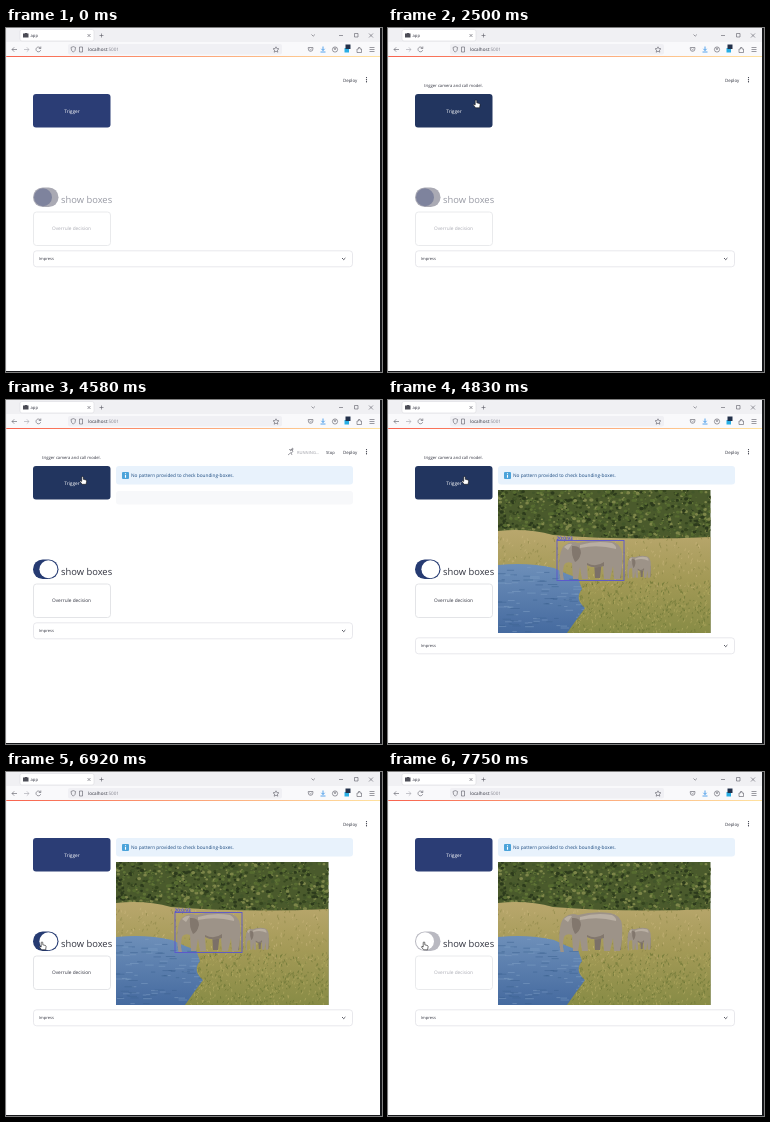
Write an HTML page that moves like this. It is 376x344 px and loops after 8000 ms.

```html
<!DOCTYPE html>
<html lang="en">
<head>
<meta charset="utf-8">
<title>app</title>
<style>
  html, body { margin: 0; width: 100%; height: 100%; overflow: hidden; background: #fff; }
  svg { display: block; width: 376px; height: 344px; }
  text { font: 4.75px "Open Sans", "Noto Sans", sans-serif; fill: #31333f; text-rendering: geometricPrecision; }
  .mid { text-anchor: middle; }
  .line { fill: none; stroke: #5c5c66; stroke-width: .6; }
</style>
</head>
<body>
<svg viewBox="0 0 376 344">
  <defs>
    <linearGradient id="stripe">
      <stop offset="0" stop-color="#f8634f"/><stop offset="1" stop-color="#ffe2a0"/>
    </linearGradient>
    <linearGradient id="lake" x2="0" y2="1">
      <stop offset="0" stop-color="#6d8fb9"/><stop offset="1" stop-color="#456a9f"/>
    </linearGradient>
    <linearGradient id="ground" x2="0" y2="1">
      <stop offset="0" stop-color="#b9a76d"/><stop offset=".45" stop-color="#a49a57"/>
      <stop offset="1" stop-color="#878b45"/>
    </linearGradient>
    <clipPath id="crop"><path d="M110 90H322.500V233H110Z"/></clipPath>
    <clipPath id="shore"><path id="shoreShape" d="M110 165Q140 162 166 168Q178 174 190 178L194 189Q186 199 197 208Q188 220 179 233H110Z"/></clipPath>
    <g id="elephant">
      <path fill="#7b7068" d="M206 160H214L212 178H207ZM229 158H234L233 178H229Z"/>
      <path fill="#9d9388" d="M177 145Q183 140 190 143Q205 139 222 141Q233 143 234 153Q235 166 232 179H226L225 166L222 179H216L215 166Q205 169 199 165L200 179H194L192 167L190 179H185L184 163Q178 161 176 165Q174 173 176 180H172.500Q170 168 172 156Q173 148 177 145Z"/>
      <path fill="#82776d" d="M184 146Q193 145 193 153Q191 161 187 162Q183 155 184 146ZM199 163Q208 168 216 162V166Q206 169 199 165Z"/>
      <path fill="#b9afa3" d="M192 145Q208 140 224 143Q229 146 228 149Q210 144 192 148ZM176 147Q180 143 184 144L180 150Z"/>
    </g>
  </defs>

  <!-- browser window -->
  <rect width="376" height="344" fill="#fff"/>
  <path d="M0 0H374V14H0Z" fill="#f0f0f3"/>
  <path d="M0 14H374V28H0Z" fill="#f9f9fb"/>
  <rect x="14" y="1.500" width="74" height="11.500" rx="2" fill="#fff" stroke="#dcdce1" stroke-width=".6"/>
  <path d="M17 5.500h1.500l.7-.6h1.600l.7.6h1v4h-5.500z" fill="#4b4c55"/>
  <text x="24.500" y="9" style="font-size:4.200px">app</text>
  <rect x="62" y="16" width="214" height="10.500" rx="2" fill="#f0f0f4"/>
  <text x="82" y="23" style="font-size:4.600px">localhost<tspan fill="#85858f">:5001</tspan></text>
  <g class="line">
    <path d="M81.500 6l3 3m0-3l-3 3M93.500 7.500h4m-2-2v4M305.500 6.500l1.700 1.700 1.700-1.700M333 7.500h4M348.500 5.500h3.500v3.500h-3.500zM363 5.500l4 4m0-4l-4 4"/>
    <path d="M11 21.500H6m2.200-2.200L6 21.500l2.200 2.200M34.500 20.200a2.400 2.400 0 1 0 .2 2M34.800 18.500v2h-2"/>
    <path d="M18 21.500h5m-2.200-2.200l2.200 2.200-2.200 2.200" stroke="#a5a5ad"/>
    <path d="M65 19.500l2.300-.9 2.300.9q0 3.500-2.300 4.700-2.300-1.200-2.300-4.700zM73.500 19h3v5h-3zM270 18.800l.9 1.800 2 .2-1.500 1.400.4 2-1.800-1-1.800 1 .4-2-1.500-1.400 2-.2z"/>
    <path d="M302.300 19.500h4.600v1.500a2.300 2.300 0 0 1-4.600 0zM303.500 20.800l1.100 1 1.100-1M351 21h1.500v-1.500h1.500V21h1.500v3.500H351zM363.500 19.500h5m-5 2h5m-5 2h5"/>
    <circle cx="329" cy="21.500" r="2.600"/><circle cx="329" cy="20.800" r=".8"/>
  </g>
  <path d="M317 18.500v4m-1.700-1.700l1.700 1.700 1.700-1.700M314.500 24h5" fill="none" stroke="#2f8fe8" stroke-width=".8"/>
  <path d="M338.500 20h4.500v4.500h-4.500z" fill="#28aee4"/>
  <path d="M339.500 16.500h5V21h-5z" fill="#22304a"/>
  <rect y="28" width="374" height="1" fill="url(#stripe)"/>

  <!-- page -->
  <text x="337" y="53.500" style="font-size:4.400px">Deploy</text>
  <path d="M360.500 49.500v.1m0 2v.1m0 2v.1" stroke="#31333f" stroke-width="1.200" stroke-linecap="round"/>
  <g id="running">
    <g id="runner" class="line"></g>
    <text x="291" y="53.500" style="font-size:4.100px;fill:#9a9ba3">RUNNING...</text>
    <text x="320" y="53.500" style="font-size:4.200px">Stop</text>
  </g>
  <rect id="trigger" x="27" y="66" width="77.500" height="33.500" rx="3"/>
  <text class="mid" x="66" y="84.600" style="fill:#fff">Trigger</text>
  <text id="tip" x="36" y="58.600" style="font-size:4.170px">trigger camera and call model.</text>
  <g id="info">
    <rect x="110" y="66" width="237" height="18.500" rx="3" fill="#e8f2fc"/>
    <rect x="116" y="72" width="7" height="7" rx="1" fill="#4ba3da"/>
    <path d="M119.500 73.200v1m0 .8v2.800" stroke="#fff" stroke-width="1.100"/>
    <text x="125" y="77" style="fill:#1c4b80">No pattern provided to check bounding-boxes.</text>
  </g>
  <rect id="skeleton" x="110" y="91" width="237" height="13.500" rx="3" fill="#f7f8fa"/>
  <rect id="track" x="27" y="159.500" width="25.500" height="19.500" rx="9.750"/>
  <circle id="knob" cy="169.250" r="9"/>
  <text id="label" x="55" y="174.800" style="font-size:9.400px">show boxes</text>
  <rect id="overrule" x="27.500" y="184" width="77" height="33.500" rx="3" fill="#fff" stroke-width=".8"/>
  <text id="overruleText" class="mid" x="65.500" y="202.300">Overrule decision</text>
  <g id="expander">
    <rect x="27.500" y="222.800" width="319" height="16" rx="3" fill="#fff" stroke="#e2e3e7" stroke-width=".8"/>
    <text x="33" y="232.300" style="font-size:4px">Impress</text>
    <path class="line" d="M336 230l1.700 1.700 1.700-1.700" style="stroke:#31333f;stroke-width:.8"/>
  </g>

  <g id="photo" clip-path="url(#crop)">
    <path d="M110 90H323V234H110Z" fill="#4a5a2c"/>
    <g id="bushes"></g>
    <path d="M110 131Q140 128 165 135Q240 141 323 137V234H110Z" fill="url(#ground)"/>
    <g id="grass"></g>
    <use href="#shoreShape" fill="url(#lake)"/>
    <g id="ripples" clip-path="url(#shore)"></g>
    <use href="#elephant"/>
    <use href="#elephant" transform="translate(175.500 76.500) scale(.373 .565)"/>
    <g id="boxes">
      <rect x="169" y="140.500" width="67" height="40" fill="none" stroke="#5a55cf" stroke-width=".9"/>
      <text x="168.500" y="140" style="fill:#3d40f0;font-weight:600">20:0.93</text>
    </g>
  </g>

  <path id="arrow" d="M0 0V8.500L2 6.700L3.400 9.600L4.700 9L3.400 6.200H6Z" fill="#fff" stroke="#111" stroke-width=".6"/>
  <path id="hand" d="M-.8 4V.4Q0-.6.8.4V2.800L3.500 3.500Q4.200 3.800 4.100 4.800L3.600 7.800H-.4L-2.600 4.900Q-2.400 3.700-.8 4.900Z" fill="#fff" stroke="#111" stroke-width=".6"/>

  <path d="M374 0h2v344H0v-1h374z" fill="#17181b"/>
  <path d="M0 0V343" stroke="#dcdce0" stroke-width=".6"/>
</svg>

<script>
const $ = id => document.getElementById(id);
const show = (id, on) => $(id).style.display = on ? "" : "none";
const set = (id, attrs) => {
  for (const key in attrs) $(id).setAttribute(key, attrs[key]);
};

let seed = 11;
const rand = (a, b) => {
  seed = (seed * 16807) % 2147483647;
  return a + (b - a) * seed / 2147483647;
};

// Scatter many copies of a small shape as one path.
function scatter(id, n, [x0, x1, y0, y1], shape, style) {
  let d = "";
  for (let i = 0; i < n; i++)
    d += `M${rand(x0, x1).toFixed(1)} ${rand(y0, y1).toFixed(1)}` + shape();
  $(id).innerHTML += `<path d="${d}" style="${style}"/>`;
}
const leaf = () => {
  const r = rand(.5, 2.2), h = r * .8;
  return `a${r} ${h} 0 1 0 ${2 * r} 0a${r} ${h} 0 1 0 ${-2 * r} 0`;
};
const blade = () => `l${rand(-1, 1.5)} ${-rand(1, 3)}`;
const wave = () => `h${rand(3, 10)}`;
const stroke = (color, width) => `fill:none;stroke:${color};stroke-width:${width}`;

for (const color of ["#35451f", "#5f7336", "#43562a", "#7d8649", "#2c3a1c", "#566b30"])
  scatter("bushes", 200, [106, 322, 90, 140], leaf, "fill:" + color);
scatter("grass", 220, [110, 322, 136, 190], blade, stroke("#8f8849", .7));
scatter("grass", 160, [110, 322, 138, 190], blade, stroke("#c9b67c", .6));
scatter("grass", 330, [172, 322, 183, 235], blade, stroke("#6c7636", .7));
scatter("grass", 330, [172, 322, 183, 235], blade, stroke("#b3aa62", .6));
scatter("ripples", 60, [108, 204, 166, 232], wave, stroke("#7f9fc5", .5));
scatter("ripples", 60, [108, 204, 170, 232], wave, stroke("#3b608f", .5));

const LOOP = 8000, FPS = 12;
// time, x, y of the pointer tip
const pointer = [
  [80, 378, 100], [830, 94, 68], [1420, 94, 68], [1670, 88, 72],
  [2500, 88, 72], [3000, 76.5, 76.5], [6333, 76.5, 76.5], [6920, 36, 170]
];
const ease = p => p * p * (3 - 2 * p);

function pointerAt(t) {
  const i = pointer.findIndex(k => k[0] > t);
  if (i < 0) return pointer.at(-1).slice(1);
  if (i === 0) return pointer[0].slice(1);
  const [a, b] = [pointer[i - 1], pointer[i]];
  const p = ease((t - a[0]) / (b[0] - a[0]));
  return [a[1] + (b[1] - a[1]) * p, a[2] + (b[2] - a[2]) * p];
}

const within = (t, a, b) => t >= a && t < b;
const poses = [
  "M284 51l2-1.500 1 2-2 1.500 1 2M285 52.500l-3 2.500M286 50l-3-.5",
  "M284 51l2-1.500 0 2.500-2 3M286 52l2 2.500M286 50l2 1"
];

function draw(ms) {
  const t = Math.floor((ms % LOOP + 5) * FPS / 1000) * 1000 / FPS;

  const [x, y] = pointerAt(t);
  const hover = x > 27 && x < 104 && y > 66 && y < 99;
  const hand = hover || y > 159;
  const at = { transform: `translate(${x} ${y})` };
  set("arrow", at);
  set("hand", at);
  show("arrow", !hand);
  show("hand", hand);

  set("trigger", { fill: hover ? "#22355f" : "#2b3d75" });
  show("tip", hover && t > 1150);

  const running = within(t, 3660, 4830);
  show("running", running);
  if (running) $("runner").innerHTML =
    `<circle cx="286.500" cy="49" r=".7"/><path d="${poses[Math.floor(t / 160) % 2]}"/>`;

  const ready = t > 4400;
  const photo = within(t, 4660, 7240) || t > 7490;
  show("info", ready);
  show("skeleton", within(t, 4490, 4660));
  show("photo", photo);
  show("boxes", t < 7240);
  set("expander", { transform: `translate(0 ${photo ? 15 : 0})` });

  const on = within(t, 4400, 7160);
  const slide = t < 4400 ? 0 : on ? 1 : Math.max(0, 1 - (t - 7160) / 160);
  set("track", { fill: !ready ? "#aaaab4" : on ? "#263b72" : "#b9b9c1" });
  set("knob", { cx: 37 + 5.4 * slide, fill: ready ? "#fff" : "#7e839d" });
  $("label").style.fill = ready ? "#31333f" : "#989aa4";

  const enabled = within(t, 4400, 7240);
  set("overrule", { stroke: enabled ? "#dcdde1" : "#e4e5e8" });
  $("overruleText").style.fill = enabled ? "#31333f" : "#abacb4";
}

const start = performance.now();
function tick() {
  draw(performance.now() - start);
  requestAnimationFrame(tick);
}
tick();
</script>
</body>
</html>
```
